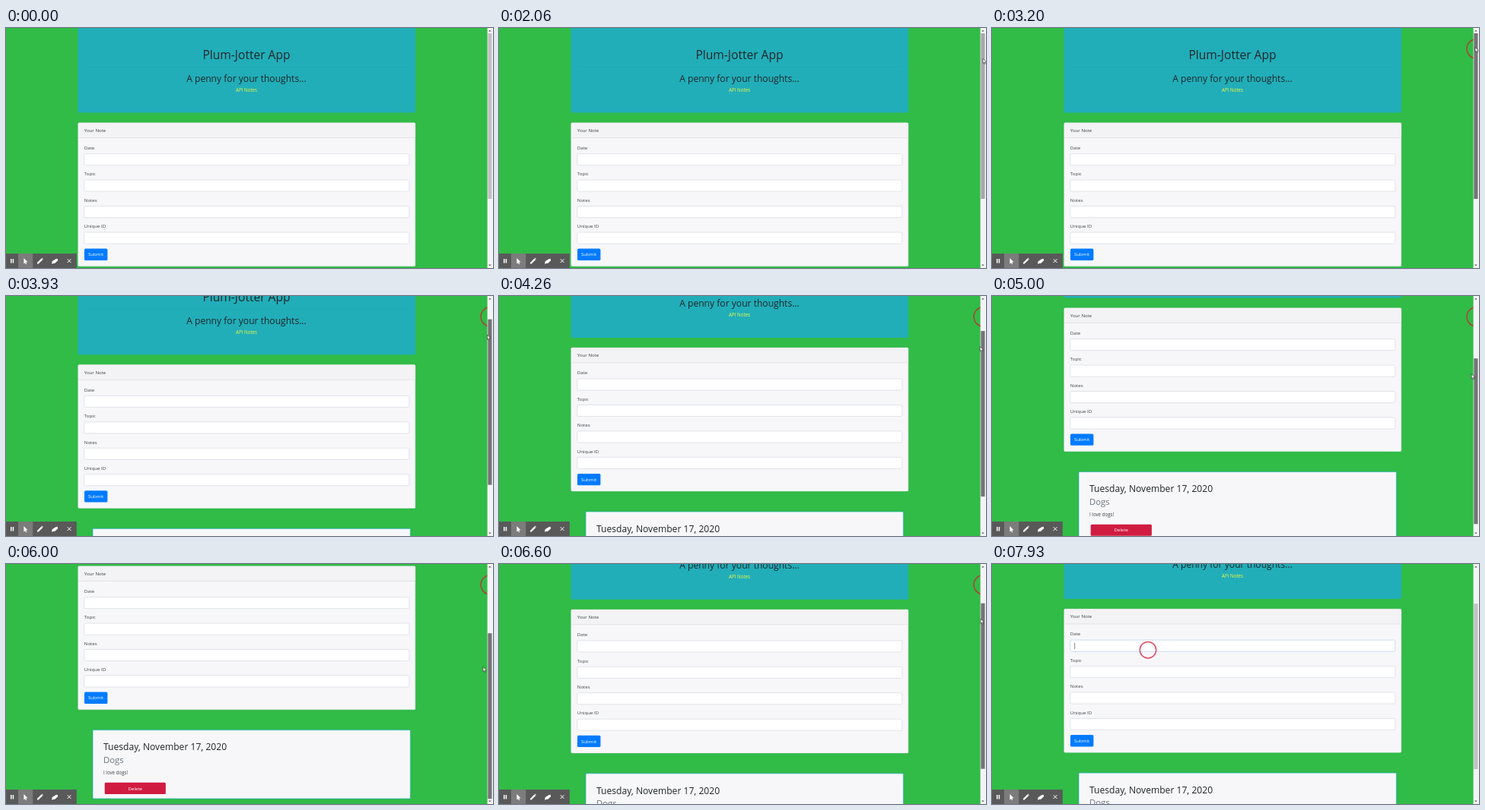
Animation, 640 px wide and 316 px high, one loop 8 s. Source, as an HTML page:

```html
<!DOCTYPE html>
<html lang="en">
<head>
<meta charset="utf-8">
<title>Notes form</title>
<style>
  html, body { margin: 0; width: 100%; height: 100%; overflow: hidden; background: #31bb47; }
  svg { display: block; width: 100vw; height: 100vh; }
  text { font-family: "Open Sans", "Noto Sans", sans-serif; font-size: 6.1px; fill: #3c4247; }
  .head { font-weight: 500; fill: #212529; }
  .mid { text-anchor: middle; }
  .white { fill: #fff; }
</style>
</head>
<body>
<svg viewBox="0 0 640 316" preserveAspectRatio="none">
  <rect width="640" height="316" fill="#31bb47"/>
  <g id="page">
    <rect x="94.5" y="-2" width="443.5" height="113.5" rx="2" fill="#21aeb9"/>
    <path d="M107 51.5H526" stroke="#000" stroke-opacity=".08" stroke-width=".5"/>
    <text class="head mid" x="316" y="41.3" style="font-size:15.6px">Plum-Jotter App</text>
    <text class="head mid" x="316" y="70.8" style="font-size:12.1px">A penny for your thoughts...</text>
    <text class="mid" x="316" y="83.8" style="font-size:6.2px;fill:#f3f83c">API Notes</text>

    <rect x="94.7" y="124.7" width="443.2" height="189" rx="1.5" fill="#f7f7fa" stroke="#d9dfdc" stroke-width=".4"/>
    <path d="M95 144.5V126q0-1 1-1h440.6q1 0 1 1v18.5z" fill="#f3f3f5"/>
    <path d="M95 144.5h442.8" stroke="#d9d9dc" stroke-width=".6"/>
    <text x="102.8" y="136.9">Your Note</text>
    <g id="fields"></g>
    <path id="caret" d="M108.7 169.3v8.4" stroke="#333" stroke-width=".6"/>
    <rect x="103" y="290.5" width="30.4" height="15.4" rx="1.5" fill="#007bff"/>
    <text class="mid white" x="118.1" y="300.4">Submit</text>

    <rect x="114" y="340.6" width="417.4" height="90.4" rx="1" fill="#f7f7fa" stroke="#21aeb9" stroke-width=".7"/>
    <text class="head" x="128" y="367.3" style="font-size:12.1px">Tuesday, November 17, 2020</text>
    <text class="head" x="128" y="383.9" style="font-size:11.3px;fill:#6c757d">Dogs</text>
    <text x="128" y="399.2" style="font-size:6.2px">I love dogs!</text>
    <rect x="129.7" y="409.7" width="80.2" height="15.2" rx="1.5" fill="#d01c40"/>
    <text class="mid white" x="169.8" y="419.5">Delete</text>
  </g>

  <circle id="ring" fill="none" stroke="#dc1432" stroke-opacity=".75" stroke-width="1.5"/>

  <g id="scrollbar">
    <rect x="632.6" width="7.4" height="316" fill="#f4f4f4"/>
    <path d="M634.2 4.6l1.7-1.8 1.7 1.8zM634.2 311.4l1.7 1.8 1.7-1.8z" fill="#505050"/>
    <rect id="thumb" x="633.3" width="5.2" height="218"/>
  </g>

  <g id="toolbar">
    <rect y="297" width="92.8" height="19" fill="#595959"/>
    <rect x="16" y="297" width="19.2" height="19" fill="#7c7c7c"/>
    <g fill="#fff">
      <path d="M6 304h1.5v5.6H6zM8.7 304h1.5v5.6H8.7z"/>
      <path d="M23.4 303v7.4l1.7-1.4 1 2.2 1.1-.5-1-2.2 2.3-.2z"/>
      <path d="M41 310.6v-1.6l5.4-5.4 1.6 1.6-5.4 5.4zM46.8 303.2l.6-.6 1.6 1.6-.6.6z"/>
      <path d="M60.2 310.9l.4-3.6 5-3.4 2.2-.2.3 2.6-3.9 3.5-2.6.2z"/>
    </g>
    <path d="M80.7 304.2l4.8 4.8M85.5 304.2l-4.8 4.8" stroke="#fff" stroke-width="1"/>
  </g>

  <path id="cursor" d="M-2-3.6V2.6L-.6 1.4.4 3.6 1.4 3.1.5 1H2.4z" fill="#fff" stroke="#222" stroke-width=".6"/>
</svg>
<script>
const LOOP = 8000, FPMS = 0.015;
const BOTTOM = 122, THUMB_TOP = 7, RATIO = 0.69, GRAB_Y = 31;
const $ = id => document.getElementById(id);
const set = (el, attrs) => { for (const k in attrs) el.setAttribute(k, attrs[k]); };
const show = (el, on) => { el.style.display = on ? '' : 'none'; };
const clamp = (v, lo, hi) => Math.min(hi, Math.max(lo, v));

// Pointer path: time, x, y
const path = [
  [2060, 638, 44], [2200, 637, 40], [2530, 637, 40], [2800, 637, 29],
  [3200, 637, 29], [3465, 636.5, 31], [3930, 634.5, 54.5], [4330, 634, 73],
  [4400, 634, 74], [4530, 633.5, 83.8], [4660, 633.5, 91], [4800, 633.5, 92],
  [5460, 629, 139], [6000, 629, 139], [6600, 635, 75.7], [6800, 635, 76.2],
  [6940, 635, 76.2], [7600, 205, 113]
];

['Date', 'Topic', 'Notes', 'Unique ID'].forEach((label, i) => {
  const y = i * 34.45;
  $('fields').insertAdjacentHTML('beforeend',
    `<text x="102.8" y="${159.9 + y}">${label}</text>
     <rect x="102.8" y="${165.6 + y}" width="427" height="15.1" rx="1.5"
       fill="#fff" stroke="#ced4da" stroke-width=".6"/>`);
});
const dateBox = $('fields').querySelector('rect');

function pointer(t) {
  const i = path.findIndex(p => p[0] > t);
  if (i === 0) return path[0].slice(1);
  if (i < 0) return path[path.length - 1].slice(1);
  const [t0, x0, y0] = path[i - 1], [t1, x1, y1] = path[i];
  const k = (t - t0) / (t1 - t0);
  return [x0 + (x1 - x0) * k, y0 + (y1 - y0) * k];
}

function draw(now) {
  const t = Math.floor((now % LOOP + 10) * FPMS) / FPMS;
  const [x, y] = pointer(t);
  const dragY = pointer(clamp(t, 3200, 6900))[1];
  const scroll = clamp((dragY - GRAB_Y) / RATIO, 0, BOTTOM);
  const pressed = t >= 3120 && t < 6990;
  const clicked = t >= 7850;
  const focused = t >= 7920;

  set($('page'), { transform: `translate(0 ${-scroll})` });
  const hover = t >= 2050 && t < 3120;
  set($('thumb'), {
    y: THUMB_TOP + scroll * RATIO,
    fill: pressed ? '#747474' : hover ? '#a8a8a8' : '#c1c1c1'
  });

  show($('ring'), pressed || clicked);
  if (clicked) set($('ring'), { cx: 205, cy: 113.2, r: focused ? 10.7 : 7 });
  else set($('ring'), { cx: 636.8, cy: 27.3, r: t < 3190 ? 9 : 12.8 });

  show($('caret'), focused);
  set(dateBox, { stroke: focused ? '#a9cbe4' : '#ced4da' });

  show($('cursor'), t >= 2050 && t < 7590);
  set($('cursor'), { transform: `translate(${x} ${y})` });
}

const start = performance.now();
function tick() {
  draw(performance.now() - start);
  requestAnimationFrame(tick);
}
tick();
</script>
</body>
</html>
```
